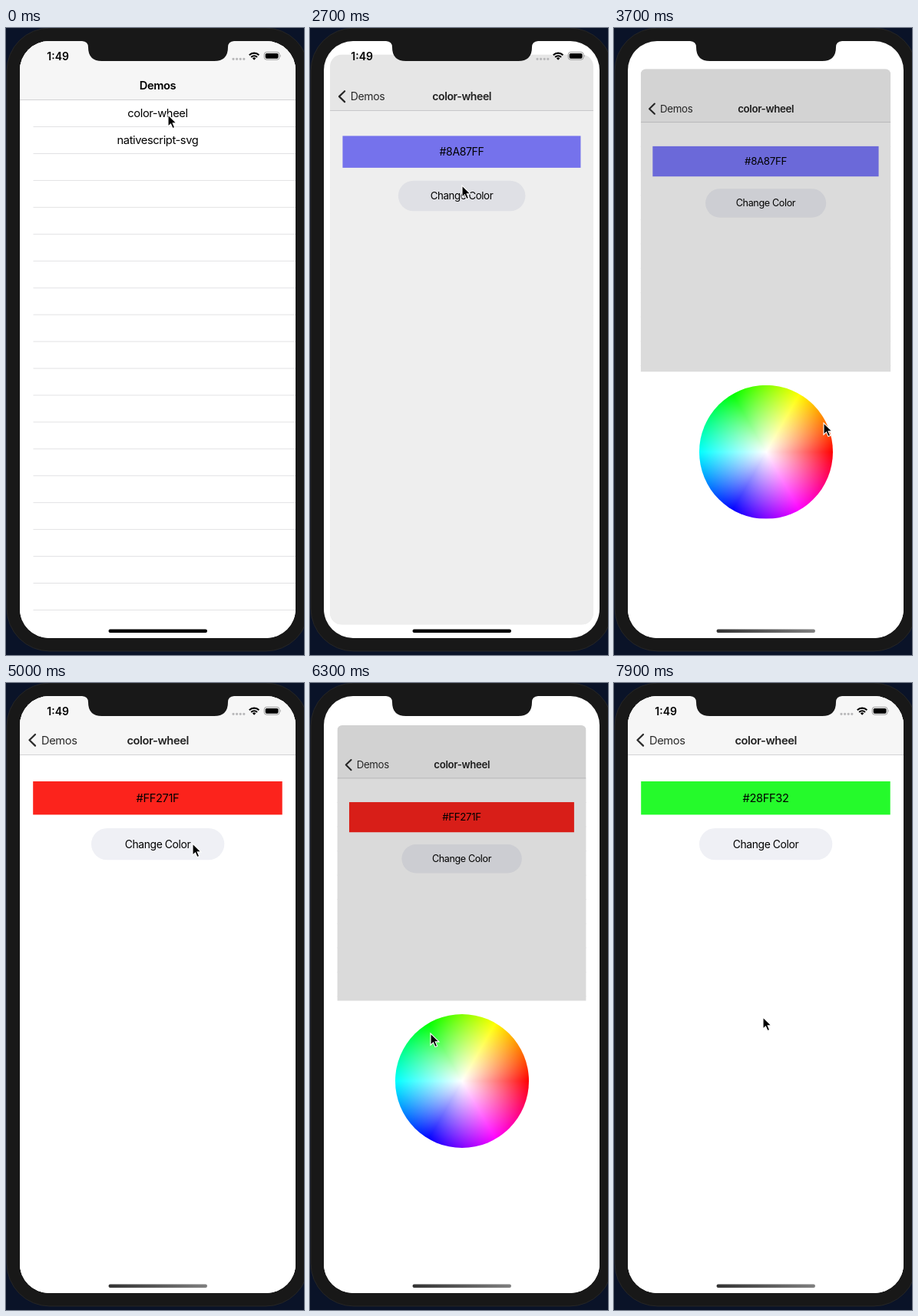
These frames come from a looping animation (388x816 px, 8.3 s). An HTML page:

```html
<!DOCTYPE html>
<html lang="en">
<head>
<meta charset="utf-8">
<title>Color wheel demo</title>
<style>
html, body { margin: 0; height: 100%; overflow: hidden; background: #0a1328; }
svg { display: block; width: 388px; height: 816px; }
text { font: 14.7px Inter, "Liberation Sans", sans-serif; letter-spacing: -.4px; }
.mid { text-anchor: middle; }
.bold { font-weight: 600; }
#wheel {
  width: 174px; height: 174px; border-radius: 50%;
  background:
    radial-gradient(closest-side, #fff, rgba(255, 255, 255, 0)),
    conic-gradient(from 90deg, #f00, #f0f, #00f, #0ff, #0f0, #ff0, #f00);
}
</style>
</head>
<body>
<svg viewBox="0 0 388 816">
  <defs>
    <clipPath id="screenClip"><rect x="18" y="17" width="359" height="777" rx="38"/></clipPath>
    <clipPath id="pageClip"><rect id="pageShape" x="18" y="17" width="359" height="777"/></clipPath>
    <linearGradient id="fade"><stop stop-color="#333"/><stop offset=".45" stop-color="#555"/><stop offset="1" stop-color="#808080"/></linearGradient>
  </defs>

  <rect x="1" y="0" width="393" height="811" rx="56" fill="#181818" stroke="#262626"/>

  <g clip-path="url(#screenClip)">
    <rect x="18" y="17" width="359" height="777" fill="#fff"/>

    <g id="page" clip-path="url(#pageClip)">
      <rect x="18" y="17" width="359" height="777" fill="#fff"/>
      <g id="list">
        <path id="rows" stroke="#e2e2e4"/>
        <text class="mid" x="197.5" y="116">color-wheel</text>
        <text class="mid" x="197.5" y="151">nativescript-svg</text>
      </g>
      <rect id="listDim" x="18" y="93" width="359" height="701"/>

      <g id="detail">
        <rect x="18" y="93" width="359" height="701" fill="#fff"/>
        <rect id="bar" x="35.2" y="128" width="324.5" height="43.4"/>
        <text id="hex" class="mid" x="197.5" y="155"></text>
        <rect x="111" y="189" width="173.3" height="41.3" rx="20.6" fill="#eff0f5"/>
        <text class="mid" x="197.5" y="214.6" style="font-size:13.9px">Change Color</text>
      </g>

      <rect x="18" y="17" width="359" height="76.5" fill="#f6f6f6"/>
      <path d="M18 93.5H377" stroke="#d3d3d5"/>
      <text id="oldTitle" class="bold" y="79.7">Demos</text>
      <g id="back" fill="#2b2b2b">
        <path d="M38 67L30.5 74.3L38 81.6" fill="none" stroke="#2b2b2b" stroke-width="2.3" stroke-linecap="round" stroke-linejoin="round"/>
        <text id="backText" y="79.7">Demos</text>
      </g>
      <text id="title" class="mid bold" y="79.7" fill="#222">color-wheel</text>
      <rect id="dim" x="18" y="17" width="359" height="777"/>
    </g>

    <g id="sheet">
      <rect x="18" y="413.5" width="359" height="400" fill="#fff"/>
      <foreignObject x="110.5" y="431.3" width="174" height="174"><div id="wheel"></div></foreignObject>
    </g>

    <g id="status">
      <text class="mid bold" x="67.7" y="41.8" style="font-size:14px;letter-spacing:0">1:49</text>
      <path d="M296 40.3h15" stroke="#b8b8ba" stroke-width="3.3" stroke-linecap="round" stroke-dasharray="0 4.6"/>
      <g fill="none" stroke="#000" stroke-width="2.1">
        <path d="M316.8 35.2a9 9 0 0 1 12.6 0M319.2 37.9a5.6 5.6 0 0 1 7.8 0"/>
      </g>
      <path d="M320.9 39.4a3.2 3.2 0 0 1 4.4 0L323.1 41.8Z"/>
      <rect x="336.2" y="31.4" width="19.8" height="9.8" rx="3" fill="none" stroke="#9a9a9a"/>
      <rect x="337.7" y="32.9" width="16.8" height="6.8" rx="1.7"/>
      <path d="M357.2 34.6q1.5 1.7 0 3.4z" fill="#9a9a9a"/>
    </g>

    <path d="M99 16V17Q107 17.5 107 25Q107 43 125 43H271Q289 43 289 25Q289 17.5 297 17V16Z" fill="#181818"/>
    <rect id="home" x="133.5" y="782.6" width="128.5" height="4.4" rx="2.2"/>
  </g>

  <path id="cursor" d="M0 0V15.2L3.5 11.9L6 17.6L8.7 16.4L6.2 10.9H11Z" stroke="#fff" stroke-width="1.1"/>
</svg>

<script>
const LOOP = 8300, STEP = 100;
const $ = id => document.getElementById(id);
const set = (id, attrs) => {
  for (const name in attrs) $(id).setAttribute(name, attrs[name]);
};
const mix = (a, b, k) => a + (b - a) * k;
const clamp = v => Math.max(0, Math.min(1, v));

// Critically damped spring, 0 to 1, from time zero.
const spring = ms => {
  const u = Math.max(0, ms) * .01826;
  return 1 - (1 + u) * Math.exp(-u);
};

// Pointer stops: time, x, y
const stops = [
  [0, 211, 113], [1650, 211, 113], [2200, 198, 200], [2400, 198, 205],
  [2750, 198, 205], [3500, 273, 514], [3800, 273, 514], [4300, 272, 507],
  [4420, 272, 507], [5000, 243, 209], [5350, 243, 209], [6100, 153, 452],
  [6300, 157, 456], [7600, 157, 456], [7900, 194, 435], [LOOP, 194, 435]
];

function pointer(t) {
  const i = stops.findIndex(s => s[0] > t);
  const [t0, x0, y0] = stops[i - 1], [t1, x1, y1] = stops[i];
  let k = (t - t0) / (t1 - t0);
  k = k * k * (3 - 2 * k);
  return `translate(${mix(x0, x1, k)} ${mix(y0, y1, k)})`;
}

let lines = '';
for (let i = 1; i < 20; i++) lines += `M35.5 ${93.6 + 34.94 * i}H500`;
set('rows', { d: lines });

function draw(t) {
  const push = spring(t - 1326);
  const left = 1 - push;
  const open = spring(t - 2615) - spring(t - 3682) + spring(t - 5215) - spring(t - 6782);
  const scale = mix(1, .9025, open);
  const [hex, color] = t < 4200 ? ['#8A87FF', '#7d7afd']
    : t < 7400 ? ['#FF271F', '#fc231c'] : ['#28FF32', '#25fa2b'];

  set('list', { transform: `translate(${-108 * push})` });
  set('listDim', { opacity: .106 * push });
  set('detail', { transform: `translate(${359 * left})` });
  set('oldTitle', { x: mix(173.7, 46, push), opacity: clamp(1 - push * 1.6) });
  set('back', { opacity: clamp(push * 1.6 - .5) });
  set('backText', { x: mix(153, 46, push) });
  set('title', { x: 197.7 + 155 * left, opacity: clamp(push * 1.6 - .5) });

  set('bar', { fill: color });
  $('hex').textContent = hex;

  set('page', { transform: `translate(197.5 405.5) scale(${scale}) translate(-197.5 -405.5)` });
  set('pageShape', { rx: mix(24, 7, open) });
  set('dim', { opacity: .146 * open });
  set('sheet', { transform: `translate(0 ${777 * (1 - open)})` });
  set('status', { opacity: clamp((.9 - open) / .4) });
  set('home', { fill: t < 3600 ? '#000' : 'url(#fade)' });
  set('cursor', { transform: pointer(t) });
}

function tick() {
  const t = performance.now() % LOOP;
  draw(Math.floor(t / STEP) * STEP);
  requestAnimationFrame(tick);
}
tick();
</script>
</body>
</html>
```
